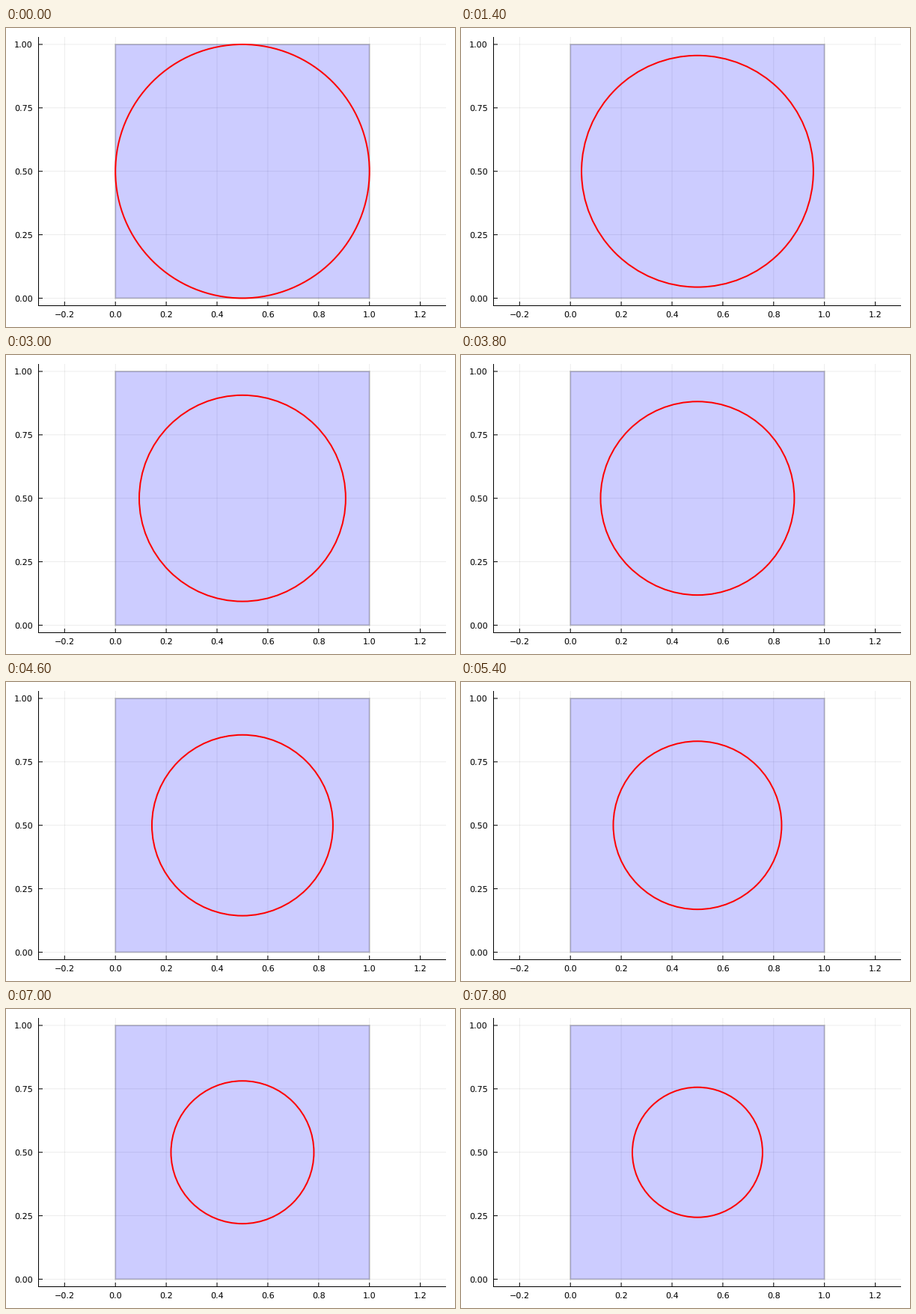
Animation of 600 by 400 pixels, one loop 8 s. Source, as a matplotlib script:

```python
import matplotlib.pyplot as plt
from matplotlib.animation import FuncAnimation
from matplotlib.patches import Circle, Rectangle

W, H, DPI = 600, 400, 100
UNIT = 339.5            # pixels per data unit
X0, Y0 = 146.2, 361.45  # pixel position of the data origin
LEFT, RIGHT, TOP, BOTTOM = 43.5, 588, 12, 371.5
FRAMES, INTERVAL = 40, 200
START_RADIUS, STEP = 0.5, 0.00625

plt.rcParams["font.family"] = "DejaVu Sans"
plt.rcParams["text.hinting"] = "none"


def px(x):
    return X0 + x * UNIT


def py(y):
    return Y0 - y * UNIT


def pt(pixels):
    return pixels * 72 / DPI


fig = plt.figure(figsize=(W / DPI, H / DPI), dpi=DPI, facecolor="white")
ax = fig.add_axes([0, 0, 1, 1])
ax.set_xlim(0, W)
ax.set_ylim(H, 0)
ax.axis("off")


def line(xs, ys, width=1.0, alpha=1.0, z=1):
    ax.plot(xs, ys, color="black", lw=pt(width), alpha=alpha, zorder=z,
            solid_capstyle="butt", snap=False)


def label(x, y, text, align):
    ax.text(x, y, text, fontsize=8, ha=align, va="baseline", zorder=5)


for i in range(-1, 7):
    x = px(i * 0.2)
    line([x, x], [TOP, BOTTOM], 0.7, 0.1)
    line([x, x], [BOTTOM, BOTTOM - 5.5], z=4)
    label(x, 387, f"{i * 0.2:.1f}".replace("-", "\u2212"), "center")

for i in range(5):
    y = py(i * 0.25)
    line([LEFT, RIGHT], [y, y], 0.7, 0.1)
    line([LEFT, LEFT + 5.5], [y, y], z=4)
    label(36, y + 4.3, f"{i * 0.25:.2f}", "right")

line([LEFT, LEFT], [TOP, BOTTOM + 0.5], z=4)
line([LEFT - 0.5, RIGHT], [BOTTOM, BOTTOM], z=4)

corner = (px(0), py(1))
ax.add_patch(Rectangle(corner, UNIT, UNIT, fc=(0, 0, 1, 0.2), ec="none",
                       zorder=2, snap=False))
ax.add_patch(Rectangle(corner, UNIT, UNIT, fc="none", ec=(0, 0, 0, 0.2),
                       lw=pt(2), zorder=2.5, snap=False))

circle = Circle((px(0.5), py(0.5)), START_RADIUS * UNIT, fc="none", ec="red",
                lw=pt(2), zorder=3)
ax.add_patch(circle)


def update(frame):
    circle.set_radius((START_RADIUS - STEP * frame) * UNIT)
    return (circle,)


anim = FuncAnimation(fig, update, frames=FRAMES, interval=INTERVAL,
                     repeat=True, repeat_delay=0, blit=False)
plt.show()
```
